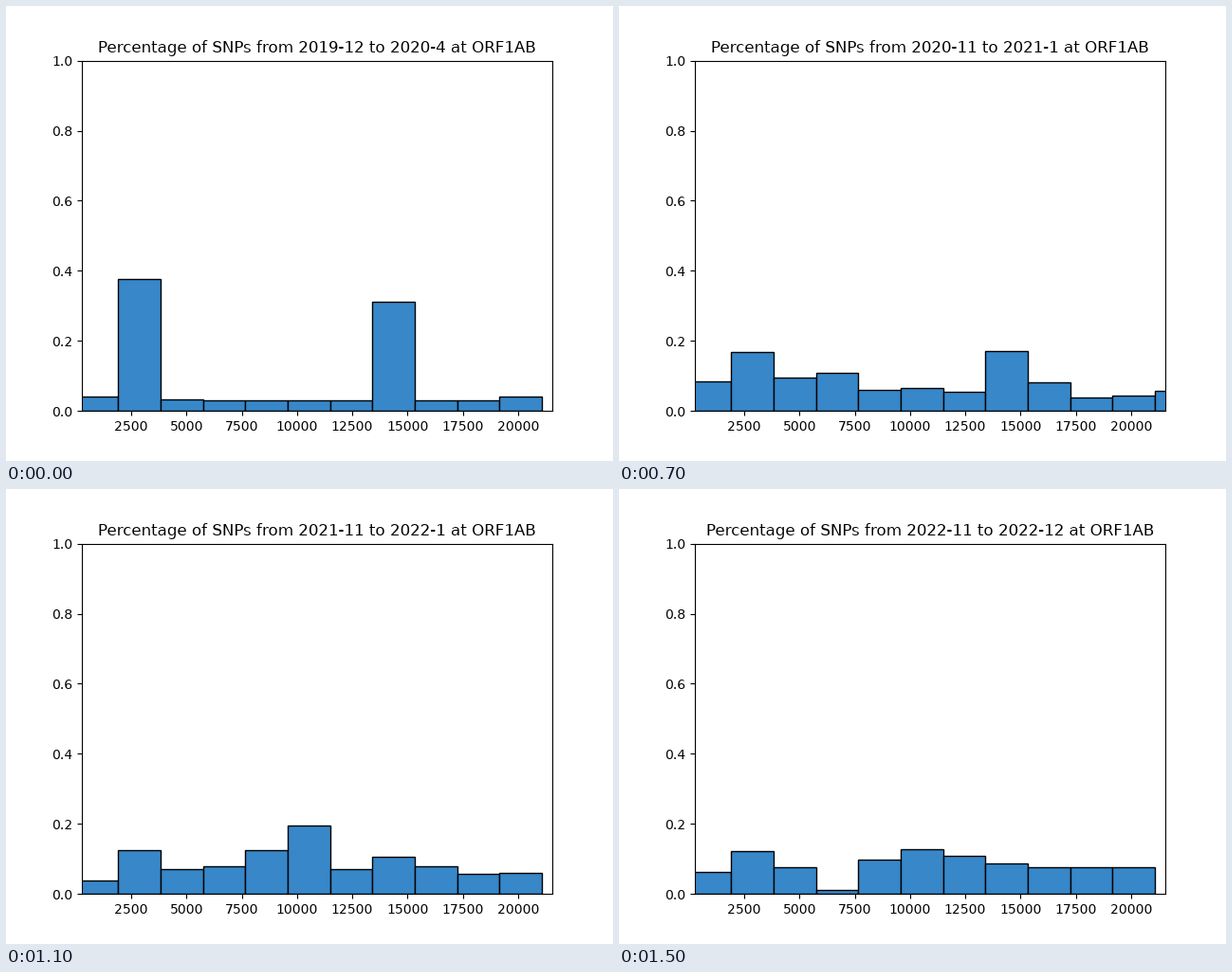
These frames come from a looping animation (640 by 480 pixels, 1.6 s). A matplotlib script:

```python
import numpy as np
import matplotlib.pyplot as plt
from matplotlib.animation import FuncAnimation

FRAMES, INTERVAL = 16, 100
HOLD = 5                      # frames the first period stays on screen
GENE_START, GENE_END = 266, 21555
BINS, BIN_WIDTH, FIRST_EDGE = 12, 1917, 1910
FLOOR = 0.012                 # least share of a full bin

# Swells and dips: bin, period of the extreme, spread, size
WAVES = [
    (0, 2, 1.8, 0.040), (0, 8, 3, -0.037),
    (2, 3, 2, 0.040),
    (3, 4.5, 2, 0.090), (3, 9.5, 1.5, -0.180),
    (4, 8, 3, 0.060),
    (5, 8, 3, 0.140),
    (6, 5, 1, -0.047), (6, 11, 2, 0.032),
    (8, 4.7, 1.8, 0.065), (8, 8, 0.7, -0.030),
    (9, 5, 2, -0.050), (9, 8.5, 1, 0.035),
    (10, 1, 0.7, 0.097), (10, 5, 3, -0.018),
    (11, 3, 1, 0.057),
]


def heights(period):
    """Slowly rising base, two fading early peaks, and the waves."""
    share = np.full(BINS, 0.08 - 0.05 * np.exp(-period / 4))
    share[-1] = 0
    share[1] += 0.045 + 0.302 * np.exp(-period / 2)
    share[7] += 0.282 * np.exp(-period / 3.3)
    for i, centre, spread, size in WAVES:
        share[i] += size * np.exp(-((period - centre) / spread) ** 2)
    share[:-1] = np.maximum(share[:-1], FLOOR)
    return share


def month_name(index):
    return f"{index // 12}-{index % 12 + 1}"


def title_text(period):
    if period == 0:
        first, last = 2019 * 12 + 11, 2020 * 12 + 3
    else:
        first = 2020 * 12 + 4 + 3 * (period - 1)
        last = min(first + 2, 2022 * 12 + 11)
    return (f"Percentage of SNPs from {month_name(first)} "
            f"to {month_name(last)} at ORF1AB")


# These text settings keep glyph widths exact at 10 and 12 pt.
plt.rcParams.update({"font.family": "DejaVu Sans",
                     "text.hinting": "native",
                     "text.hinting_factor": 9})
fig, ax = plt.subplots(figsize=(6.4, 4.8), dpi=100)
left = FIRST_EDGE + BIN_WIDTH * (np.arange(BINS) - 1)
bars = ax.bar(left, heights(0), width=BIN_WIDTH, align="edge",
              color="#3787c9", edgecolor="black", linewidth=1)
ax.set_xlim(GENE_START, GENE_END)
ax.set_ylim(0, 1)
title = ax.set_title(title_text(0))


def update(frame):
    period = max(0, frame - HOLD + 1)
    for bar, height in zip(bars, heights(period)):
        bar.set_height(height)
        bar.set_visible(height > 0.002)
    title.set_text(title_text(period))
    return [*bars, title]


anim = FuncAnimation(fig, update, frames=FRAMES, interval=INTERVAL,
                     repeat=True, repeat_delay=0, blit=False)
plt.show()
```
